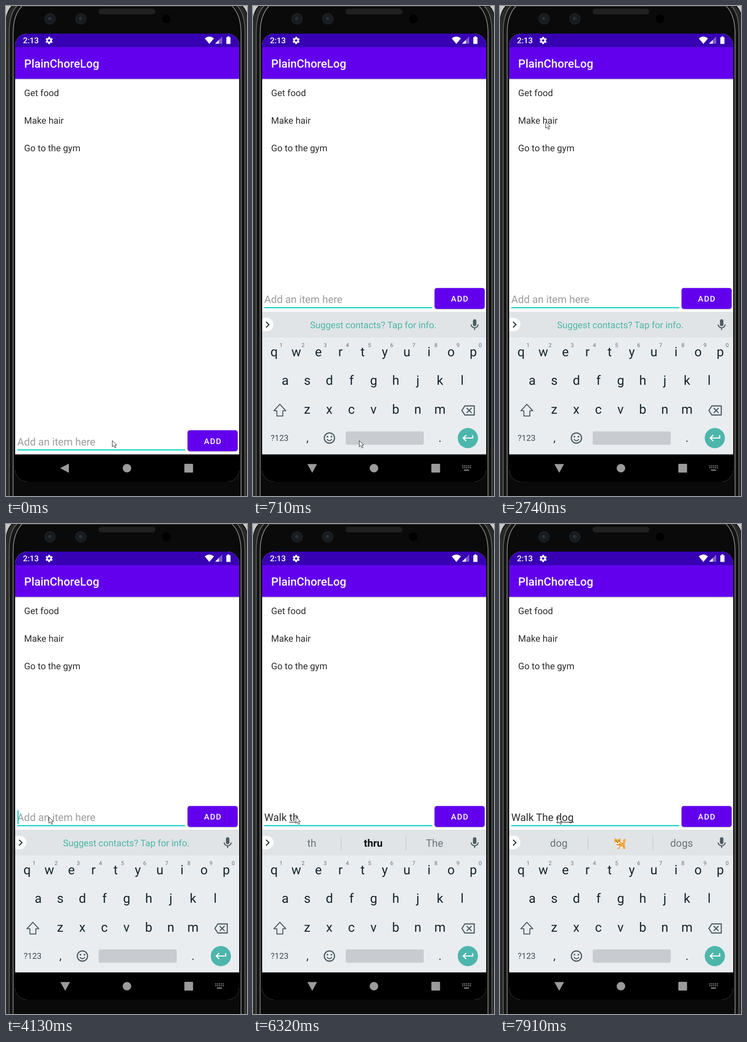
Recreate the animation shown at these times as an HTML page. Size 525 by 1066 pixels, loop 8 s.

```html
<!DOCTYPE html>
<html lang="en">
<head>
<meta charset="utf-8">
<title>Todo list</title>
<style>
html, body { margin: 0; width: 100%; height: 100%; overflow: hidden; background: #0a0a0a; }
svg { display: block; width: 100vw; height: 100vh; }
text { font-family: Roboto, sans-serif; white-space: pre; text-rendering: geometricPrecision; }
.mid { text-anchor: middle; }
.item { font-size: 19.75px; fill: #2c2c2c; }
.edit { font-size: 22.6px; fill: #2c2c2c; }
.sug { font-size: 22.4px; fill: #6b7276; text-anchor: middle; }
.key { font-size: 28px; fill: #15242c; text-anchor: middle; }
.num { font-size: 12px; fill: #667078; text-anchor: middle; }
.line { fill: none; stroke: #4c5a62; stroke-width: 2; stroke-linejoin: round; }
</style>
</head>
<body>
<svg viewBox="0 0 525 1066" xmlns="http://www.w3.org/2000/svg">
<defs>
  <clipPath id="screen"><rect x="20" y="60" width="488" height="975" rx="26"/></clipPath>
  <pattern id="mesh" width="3" height="3" patternUnits="userSpaceOnUse">
    <rect width="3" height="3" fill="#161616"/><rect width="1.5" height="1.5" fill="#3c3c3c"/>
  </pattern>
  <linearGradient id="shade" x2="0" y2="1">
    <stop stop-color="#000" stop-opacity=".22"/><stop offset="1" stop-color="#000" stop-opacity="0"/>
  </linearGradient>
  <filter id="drop" x="-10%" y="-20%" width="120%" height="150%">
    <feDropShadow dx="0" dy="1.2" stdDeviation="1" flood-opacity=".25"/>
  </filter>
  <g id="edge" fill="none">
    <path d="M-3 1066V60Q-3 10 20 -4H32Q7 10 7 60V1066Z" fill="#2a2a2a"/>
    <path d="M-3 -1H13Q3 8 0 26H-3Z" fill="#c8c8c8"/>
    <path d="M11 1066V58Q11 12 34 -4" stroke="#141414" stroke-width="7"/>
    <path d="M7 1066V58Q7 10 29 -4" stroke="#6c6c6c" stroke-width="1.6"/>
    <path d="M15.500 1066V60Q15.500 14 40 -4" stroke="#858585" stroke-width="1.8"/>
  </g>
  <g id="lens">
    <circle r="12.500" fill="#1b1e21"/><circle r="8" fill="#15191d"/>
    <circle r="5" fill="#20262c"/><circle cx="-1.500" cy="-1.500" r="1.800" fill="#3a444d"/>
  </g>
</defs>

<rect width="525" height="1066" fill="#0a0a0a"/>
<use href="#edge"/>
<use href="#edge" transform="matrix(-1 0 0 1 527.500 0)"/>
<path d="M30 .5H495" stroke="#4a4a4a"/>
<rect x="202" y="6.500" width="123" height="11" rx="5.500" fill="url(#mesh)" stroke="#252525"/>
<use href="#lens" x="96" y="28"/>
<use href="#lens" x="163" y="28"/>
<circle cx="349" cy="28" r="9.500" fill="#000"/>

<g clip-path="url(#screen)">
  <rect x="20" y="60" width="488" height="975" fill="#fff"/>
  <rect x="20" y="158" width="488" height="4" fill="url(#shade)"/>
  <rect x="20" y="60" width="488" height="30" fill="#3700b3"/>
  <rect x="20" y="89.500" width="488" height="69" fill="#6200ee"/>
  <g fill="#fff">
    <text x="37" y="81" font-size="17.4" font-weight="500">2:13</text>
    <g transform="translate(94 75) rotate(30)" fill="none" stroke="#fff">
      <circle r="4.300" stroke-width="3.400"/>
      <circle r="6.600" stroke-width="2.600" stroke-dasharray="3.800 3.112" stroke-dashoffset="1.900"/>
    </g>
    <path d="M433 70.500Q443 62.500 453 70.500L443 82.500Z"/>
    <path d="M471 66.500V82H455.500Z" opacity=".35"/>
    <path d="M463.500 74V82H455.500Z"/>
    <path d="M480 68h2.500v-2h4v2h2.500v14.500h-9Z"/>
    <text x="39.500" y="134" font-size="24.85" font-weight="500">PlainChoreLog</text>
  </g>
  <text class="item" x="39.500" y="196">Get food</text>
  <text class="item" x="39.500" y="256">Make hair</text>
  <text class="item" x="39.500" y="315.500">Go to the gym</text>

  <g id="row">
    <rect x="24.500" y="655" width="366" height="2.500" fill="#0bd3bf"/>
    <text id="hint" class="edit" x="24.500" y="646" style="fill:#9c9c9c">Add an item here</text>
    <text id="typed" class="edit" x="24.500" y="646"></text>
    <rect id="under" y="648.200" height="1.300" fill="#2c2c2c"/>
    <rect id="caret" y="622.500" width="2.500" height="30" fill="#0bd3bf"/>
    <rect x="395.500" y="613.500" width="109.200" height="45.500" rx="5" fill="#6200ee" filter="url(#drop)"/>
    <text class="mid" x="450.800" y="643" font-size="17.4" font-weight="500" letter-spacing="1.55" fill="#fff">ADD</text>
  </g>

  <g id="board">
    <rect x="20" y="665" width="488" height="311" fill="#e9edf0"/>
    <rect x="20" y="665" width="488" height="56" fill="#e0e4e7"/>
    <path d="M20 678.500H30a14.500 14.500 0 0 1 0 29H20Z" fill="#fff"/>
    <path d="M28.500 687l6.300 6.200-6.300 6.200" class="line" style="stroke:#222e35;stroke-width:2.300"/>
    <text id="info" class="mid" x="262" y="701" font-size="19.9" fill="#4db6a4">Suggest contacts? Tap for info.</text>
    <g id="strip">
      <path d="M192 678.500v31M333 678.500v31" stroke="#c5cacd" stroke-width="1.300"/>
      <text class="sug" x="128" y="702"></text>
      <text class="sug" x="262" y="702"></text>
      <text class="sug" x="395.500" y="702"></text>
    </g>
    <g id="dog">
      <path d="M268 694q-1-9 4-9 4 1 1 7l-2 4Z" fill="#f0b04c"/>
      <path d="M255 693h13q4 0 4 5l1 9h-4l-2-6-6 1-1 5h-4Z" fill="#f2a93b"/>
      <path d="M249 689l1-6 4 3h4l4-3 1 6q1 7-7 8-8-1-7-8Z" fill="#f2a93b"/>
      <path d="M250 691q6 3 12 0 0 5-6 6-6-1-6-6ZM254 698h6l-1 6h-4Z" fill="#fff0d2"/>
      <path d="M252 689.500h1.500M258.500 689.500h1.500M255 693h2" stroke="#4b3020" stroke-width="1.800"/>
      <path d="M254 698h7" stroke="#d9453c" stroke-width="1.500"/>
    </g>
    <g id="keys"></g>
    <path d="M58.500 866.500l13 14h-6.500v11.500h-13v-11.500h-6.500Z" class="line"/>
    <text class="mid" x="58" y="946" font-size="18" fill="#3f4d55">?123</text>
    <text class="key" x="118.500" y="948" style="font-size:24px">,</text>
    <text class="key" x="407.500" y="948" style="font-size:24px">.</text>
    <rect x="202" y="925.500" width="170" height="29" rx="4" fill="#c8ccd0"/>
    <circle cx="468" cy="940" r="22" fill="#4db6ac"/>
    <g id="icons" fill="#4c5a62">
      <g transform="translate(468 679) scale(1.24)">
        <rect x="9" y="2" width="6" height="12" rx="3"/>
        <path d="M5.800 11a6.200 6 0 0 0 12.400 0M12 17v4" class="line" style="stroke-width:1.800"/>
      </g>
      <g transform="translate(453.500 865) scale(1.24)" class="line" style="stroke-width:1.900">
        <path d="M23 4H6.500L1.200 12l5.300 8H23ZM9.700 7.700l8.600 8.600M18.300 7.700l-8.600 8.600"/>
      </g>
      <g transform="translate(151.600 925) scale(1.24)">
        <circle cx="12" cy="12" r="9" class="line"/>
        <circle cx="8.500" cy="9.500" r="1.500"/><circle cx="15.500" cy="9.500" r="1.500"/>
        <path d="M7.700 14q4.300 5.500 8.600 0" class="line" style="stroke-width:1.600"/>
      </g>
      <path transform="translate(453.700 925) scale(1.24)" d="M20 7v5H3.500M8.700 6.700L3.400 12l5.300 5.300" fill="none" stroke="#fff" stroke-width="2"/>
    </g>
  </g>

  <rect x="20" y="975.500" width="488" height="60" fill="#000"/>
  <g fill="#9b9b9b">
    <path id="back"/>
    <circle cx="263.500" cy="1005.500" r="9.300"/>
    <rect x="388.500" y="996" width="19" height="19" rx="1.500"/>
    <path id="pad" d="M456 1000.500h19M456 1004.500h19" stroke="#9b9b9b" stroke-width="2.200" stroke-dasharray="2.400 1.700"/>
    <rect id="bar" x="459.500" y="1008.500" width="11" height="2.200"/>
  </g>
</g>
<path id="mouse" d="M.5 .5V14L3.700 11.200L6.200 16.500L8.600 15.400L6.200 10.300H10.300Z" fill="#fff" stroke="#222" stroke-linejoin="round"/>
</svg>

<script>
const LOOP = 8000, LEFT = 24.5;
const $ = id => document.getElementById(id);
const show = (id, on) => $(id).setAttribute('display', on ? 'inline' : 'none');
const set = (id, attrs) => { for (const k in attrs) $(id).setAttribute(k, attrs[k]); };

// time, x, y
const moves = [
  [0, 231, 945], [1700, 212, 868], [1820, 147, 696], [1960, 145, 610],
  [2080, 148, 545], [2200, 149, 509], [2350, 151, 390], [2470, 133, 260],
  [2620, 115, 255], [2740, 99, 252], [3020, 111, 369], [3160, 119, 480],
  [3290, 107, 590], [3440, 99, 622], [3560, 93, 637], [7910, 125, 637]
];
// time, finished text, word in progress, suggestions, bold middle
const typing = [
  [0, '', '', ''],
  [4510, '', 'W', ''],
  [4650, '', 'Wa', ''],
  [4900, '', 'Wal', 'Wal|Wall|Walk', true],
  [5020, '', 'Walk', 'Walk|Walking|Walked'],
  [5390, 'Walk ', '', 'to|in|and'],
  [5670, 'Walk ', 't', 't|to|the'],
  [5790, 'Walk ', 'th', 'th|thru|The', true],
  [6440, 'Walk ', 'the', 'the|The|then'],
  [6590, 'Walk The ', '', 'first|same|weekend'],
  [6830, 'Walk The ', 'd', 'd|day|different'],
  [6980, 'Walk The ', 'do', "do|don't|doing"],
  [7510, 'Walk The ', 'dog', 'dog||dogs']
];
// caret on and off, alternately
const blinks = [1110, 1700, 2080, 2620, 3020, 3560, 4130, 6320, 6440, 7910];

const latest = (list, t) => list.filter(e => e[0] <= t).pop();
const pen = document.createElement('canvas').getContext('2d');
const widthOf = s => {
  pen.font = '22.6px Roboto, sans-serif';
  return pen.measureText(s).width;
};

const label = (cls, x, y, s) => `<text class="${cls}" x="${x}" y="${y}">${s}</text>`;
const rows = [['qwertyuiop', 46, 762], ['asdfghjkl', 70, 824], ['zxcvbnm', 118, 887]];
$('keys').innerHTML = rows.map(([chars, left, y], r) =>
  [...chars].map((c, i) => {
    const x = left + i * 48.2;
    return label('key', x, y, c) + (r ? '' : label('num', x + 15, 742, (i + 1) % 10));
  }).join('')).join('');

function draw(t) {
  const open = t >= 710, nav = t >= 430;
  const [, done, word, words, bold] = latest(typing, t);
  const [, mx, my] = latest(moves, t);

  set('row', { transform: `translate(0 ${open ? 0 : 309.5})` });
  show('board', open);
  set('back', { d: nav ? 'M118.500 996.500H139.500L129 1015.500Z' : 'M118 1005.500L137 995.500V1015.500Z' });
  show('pad', nav);
  show('bar', nav);

  show('hint', !(done + word));
  $('typed').textContent = done + word;
  set('under', { x: LEFT + widthOf(done), width: widthOf(word) });
  set('caret', { x: Math.max(25, LEFT + widthOf(done + word)) });
  show('caret', blinks.filter(b => b <= t).length % 2);

  show('info', !words);
  show('strip', words);
  const parts = words.split('|');
  document.querySelectorAll('.sug').forEach((el, i) => {
    el.textContent = parts[i] || '';
    const strong = bold && i === 1;
    el.style.fontWeight = strong ? 700 : 400;
    el.style.fill = strong ? '#0b0f11' : '';
  });
  show('dog', words && !parts[1]);
  set('mouse', { transform: `translate(${mx} ${my})` });
}

const start = performance.now();
function tick() {
  draw((performance.now() - start) % LOOP);
  requestAnimationFrame(tick);
}
tick();
</script>
</body>
</html>
```
